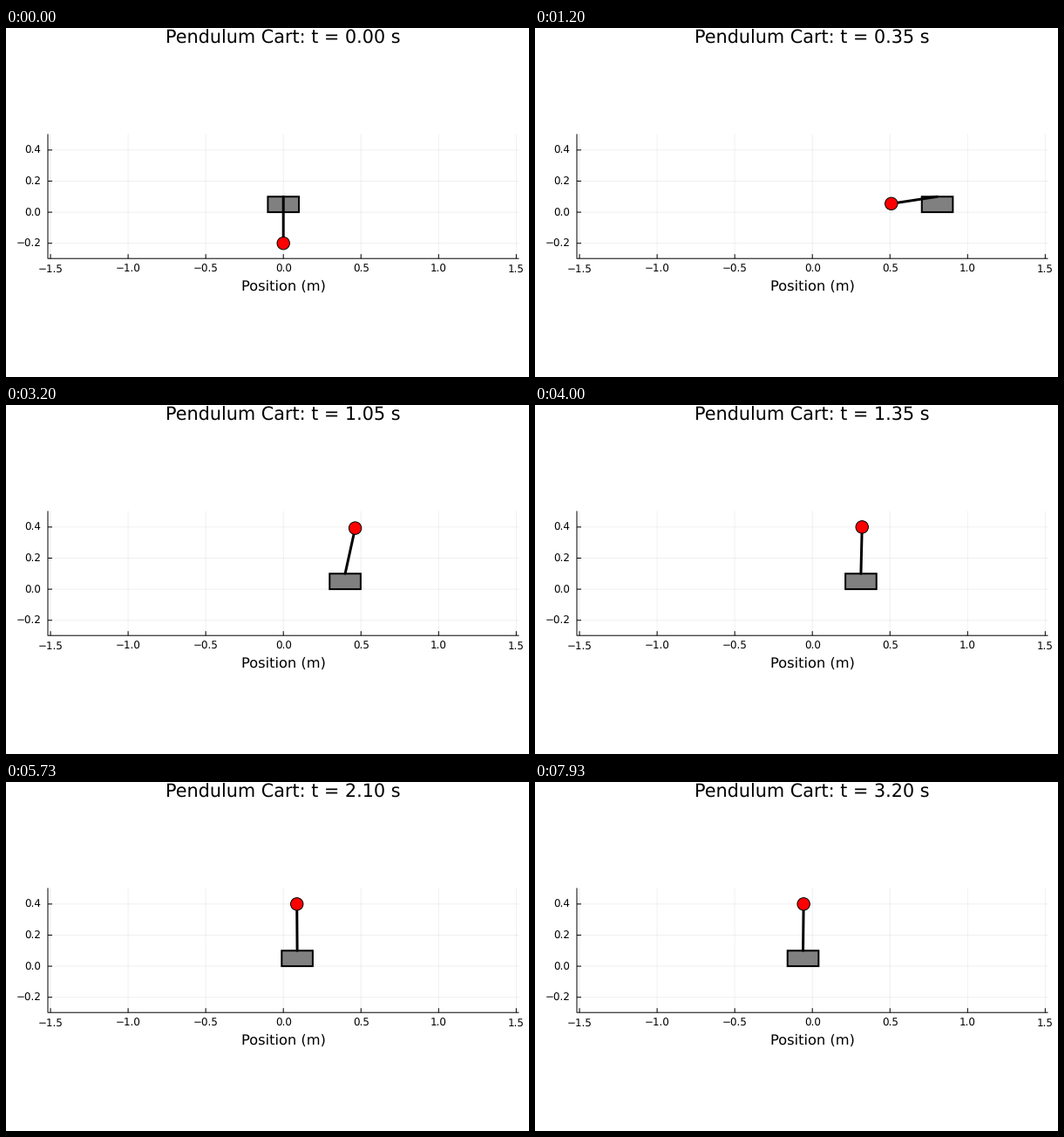
Recreate the animation shown at these times as a matplotlib script. Size 600 px wide and 400 px high, loop 8 s.

```python
import numpy as np
import matplotlib.pyplot as plt
from matplotlib.animation import FuncAnimation
from matplotlib.patches import Circle, Rectangle

W, H, DPI = 600, 400, 100
PT = 72 / DPI                        # points per pixel
FRAMES, STEP_MS = 400, 20
X0, Y0, SCALE = 318.2, 211.1, 178.1  # stage position of the origin, pixels per metre
ROD = 0.3

plt.rcParams.update({"font.family": "DejaVu Sans", "text.hinting": "none"})

# Updates land on a 30 fps grid and grow slowly further apart
n = np.arange(172)
TICKS = np.ceil(4 + 1.2 * n + 0.00098 * n ** 2).astype(int)
TICK_MS = TICKS * 10 // 3 * 10
SIM_T = np.interp(TICKS, [3, 36, 67, 96, 144, 201, 238],
                  [0, 0.35, 0.70, 1.05, 1.65, 2.59, 3.20])


def smooth(*points):
    """Cubic curve through (time, value) points, slopes taken from the neighbours."""
    ts, vs = np.array(points).T
    slopes = np.gradient(vs, ts, edge_order=2)

    def at(t):
        i = min(max(np.searchsorted(ts, t) - 1, 0), len(ts) - 2)
        h = ts[i + 1] - ts[i]
        s = (t - ts[i]) / h
        r = 1 - s
        return (r * r * (vs[i] * (1 + 2 * s) + slopes[i] * h * s)
                + s * s * (vs[i + 1] * (1 + 2 * r) - slopes[i + 1] * h * r))
    return at


# Swing-up (a push right, a hard pull back), then a gentle return to the middle
cart_x = smooth((0, 0), (0.13, 0.146), (0.265, 0.525), (0.35, 0.805), (0.49, 1.012),
                (0.60, 0.915), (0.70, 0.656), (0.80, 0.46), (0.90, 0.428),
                (1.05, 0.398), (1.5, 0.267), (2.24, 0.055), (2.59, -0.006),
                (3.2, -0.06))
rod_angle = smooth((0, 0), (0.1, -0.28), (0.2, -0.85), (0.35, -1.42), (0.45, -1.3),
                   (0.553, -0.57), (0.70, 1.145), (0.845, 2.16), (1.05, 2.925),
                   (1.3, 3.1), (1.65, 3.128), (3.2, 3.13))


def px(x):
    return X0 + SCALE * x


def py(y):
    return Y0 - SCALE * y


def text(x, y, s, size, ha="center"):
    return ax.text(x, y, s, fontsize=size * PT, ha=ha, va="baseline", color="black")


def line(xs, ys, width=1, **kw):
    return ax.plot(xs, ys, lw=width * PT, color="black", snap=False, **kw)[0]


def tick_text(v):
    return f"{v:.1f}".replace("-", "\u2212")


fig = plt.figure(figsize=(W / DPI, H / DPI), dpi=DPI, facecolor="white")
ax = fig.add_axes([0, 0, 1, 1])
ax.set_xlim(0, W)
ax.set_ylim(H, 0)
ax.axis("off")

left, right, top, bottom = 48, 588, 122, 264.2
for v in np.arange(-3, 4) / 2:
    x = px(v)
    line([x, x], [top, bottom], alpha=0.06)
    line([x, x], [bottom, bottom - 5], solid_capstyle="butt")
    text(x, 280, tick_text(v), 11.9)
for v in np.arange(-1, 3) / 5:
    y = py(v)
    line([left, right], [y, y], alpha=0.06)
    line([left, left + 5], [y, y], solid_capstyle="butt")
    text(40.5, y + 4.4, tick_text(v), 11.9, "right")
line([left, left, right], [top, bottom, bottom])
text(X0 + 0.2, 300.8, "Position (m)", 16.3)
title = text(X0 - 0.4, 18, "", 20.8)

cart = Rectangle((0, py(0.1)), 0.2 * SCALE, 0.1 * SCALE, fc="#808080", ec="black",
                 lw=2 * PT, snap=False, zorder=3)
rod = line([], [], 3, solid_capstyle="round", zorder=4)
ball = Circle((0, 0), 7.2, fc="red", ec="black", lw=PT, zorder=5)
ax.add_patch(cart)
ax.add_patch(ball)


def draw(frame):
    ms = (frame + 0.5) * STEP_MS
    done = np.searchsorted(TICK_MS, ms, side="right")
    t = SIM_T[done - 1] if done else 0
    x, a = cart_x(t), rod_angle(t)
    bx, by = x + ROD * np.sin(a), 0.1 - ROD * np.cos(a)
    cart.set_x(px(x - 0.1))
    rod.set_data([px(x), px(bx)], [py(0.1), py(by)])
    ball.center = px(bx), py(by)
    title.set_text(f"Pendulum Cart: t = {t:.2f} s")
    return cart, rod, ball, title


anim = FuncAnimation(fig, draw, frames=FRAMES, interval=STEP_MS,
                     repeat=True, repeat_delay=0, blit=False)
plt.show()
```
